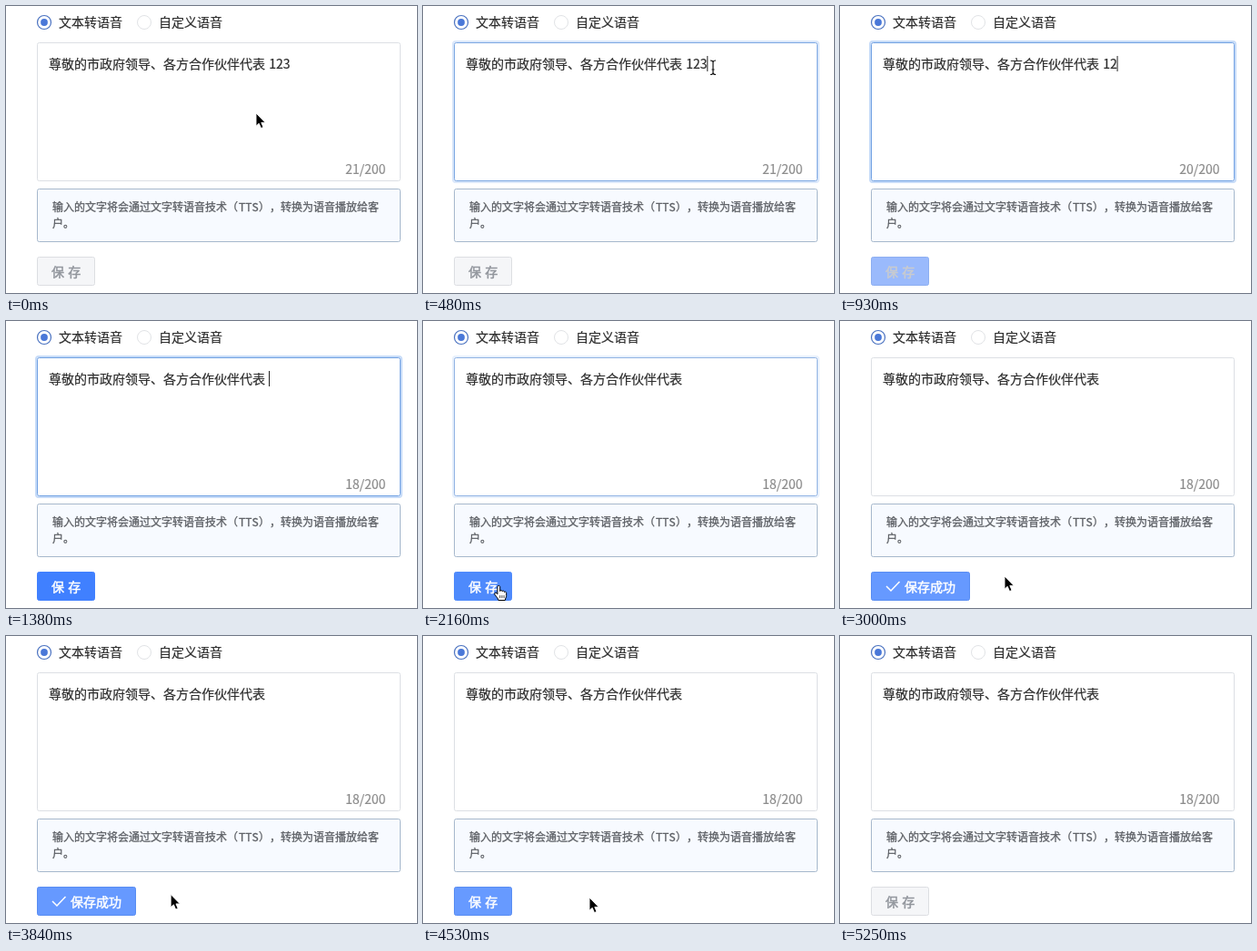
Write an HTML page that moves like this. It is 452 px wide and 316 px high and loops after 5700 ms.

```html
<!DOCTYPE html>
<html lang="zh-CN">
<head>
<meta charset="utf-8">
<title>文本转语音</title>
<style>
html, body { margin: 0; width: 100%; height: 100%; overflow: hidden; background: #fff; }
svg { display: block; width: 452px; height: 316px; }
text {
  font: 14px "Noto Sans CJK SC", "Noto Sans CJK", sans-serif;
  font-kerning: none; text-spacing-trim: space-all;
  word-spacing: 1px; white-space: pre;
  color: #2b2b2b; fill: currentColor; stroke: currentColor; stroke-width: .2px;
}
#count { color: #8c8c8c; }
.note text { font-size: 12px; color: #5c5f64; stroke-width: .3px; }
.label, .done text { stroke-width: .5px; }
.done text { color: #fff; }
</style>
</head>
<body>
<svg viewBox="0 0 452 316">
  <circle cx="42" cy="18" r="7.5" fill="#fff" stroke="#4a72c0" stroke-width="1.2"/>
  <circle cx="42" cy="18" r="3.9" fill="#4a78d8"/>
  <circle cx="152" cy="18" r="7.5" fill="#fff" stroke="#e1e3e6"/>
  <text x="58" y="23">文本转语音</text>
  <text x="168" y="23">自定义语音</text>

  <rect id="glow" x="33" y="39" width="402" height="155" rx="3" fill="none" stroke="#c6dbf8" stroke-width="2"/>
  <rect id="box" x="34.5" y="40.5" width="399" height="152" rx="2" fill="#fff"/>
  <text id="words" x="47" y="69"></text>
  <rect id="caret" y="55" width="1" height="17" fill="#222"/>
  <text id="count" x="417.5" y="185" text-anchor="end"></text>

  <g class="note">
    <rect x="34.5" y="201.5" width="399" height="58" rx="2" fill="#f7faff" stroke="#a6b8cc"/>
    <text x="51" y="226">输入的文字将会通过文字转语音技术（</text>
    <text x="256" y="226">TTS</text>
    <text x="278" y="226">），</text>
    <text x="302" y="226">转换为语音播放给客</text>
    <text x="51" y="244">户。</text>
  </g>

  <rect id="button" x="34.5" y="276.5" height="31" rx="2"/>
  <text id="save" class="label" x="50" y="298">保 存</text>
  <g id="done" class="done">
    <path id="tick" d="M51 292L56 297L65.5 287" fill="none" stroke="#fff" stroke-width="1.5" pathLength="1" stroke-dasharray="1 2"/>
    <text x="71" y="298">保存成功</text>
  </g>

  <g id="pointer">
    <path id="arrow" d="M0 0V14.2L3.2 11.3L5.5 16.6L8 15.5L5.8 10.4H10.2Z" fill="#000" stroke="#fff" stroke-width=".9"/>
    <g id="beam" fill="none">
      <path d="M-3-7.5Q0-7.5 0-5.5Q0-7.5 3-7.5M0-5.5V6M-3 8Q0 8 0 6Q0 8 3 8M-1.5 2.5H1.5" stroke="#fff" stroke-width="2.6"/>
      <path d="M-3-7.5Q0-7.5 0-5.5Q0-7.5 3-7.5M0-5.5V6M-3 8Q0 8 0 6Q0 8 3 8M-1.5 2.5H1.5" stroke="#111" stroke-width="1.2"/>
    </g>
    <g id="hand">
      <path d="M-1.6 1.2C-1.6-.6 1.2-.6 1.2 1.2V6C1.5 4.6 3.6 4.8 3.7 6.2C4.2 5.2 6 5.5 6 7C6.6 6.2 8.2 6.6 8.2 8.2V11C8.2 13 7 13.6 6.8 16H-.6C-.8 14-2.6 12.6-4.6 9.6C-5.6 8-3.6 7-2.4 8.2L-1.6 9.2Z" fill="#fff" stroke="#000"/>
      <path d="M1.2 10.5V13.5M3.4 10.5V13.5M5.6 10.5V13.5" stroke="#000" stroke-width=".7"/>
    </g>
  </g>
</svg>
<script>
const LOOP = 5700;
const SPEECH = '尊敬的市政府领导、各方合作伙伴代表 123';
const DELETES = [780, 960, 1140];
const $ = id => document.getElementById(id);
const show = (id, on) => $(id).setAttribute('visibility', on ? 'visible' : 'hidden');
const set = (id, attrs) => { for (const k in attrs) $(id).setAttribute(k, attrs[k]); };
const rgb = c => `rgb(${c.map(Math.round)})`;

// Eased value at time t between keys of the form [time, ...values]
function track(t, keys) {
  const i = keys.findIndex(k => k[0] > t);
  if (i < 0) return keys[keys.length - 1].slice(1);
  if (!i) return keys[0].slice(1);
  const a = keys[i - 1], b = keys[i];
  const u = (t - a[0]) / (b[0] - a[0]), e = u * u * (3 - 2 * u);
  return a.slice(1).map((v, j) => v + (b[j + 1] - v) * e);
}

const path = [
  [0, 275, 118], [30, 275, 118], [480, 319, 67.5], [1590, 319, 67.5],
  [2100, 83.5, 291.5], [2400, 83.5, 291.5], [3000, 181, 281],
  [3420, 181, 281], [3510, 181, 284], [3810, 181, 284], [3930, 182, 287],
  [4110, 182, 287], [4140, 183, 288], [5190, 183, 288], [5220, 186, 300]
];
const focusKeys = [[330, 0], [540, 1], [2040, 1], [2340, 0]];
const gray = [245, 246, 248], edge = [220, 222, 226], dim = [145, 149, 156];
const blue = [64, 128, 255], hover = [78, 138, 252], white = [255, 255, 255];
const pale = [102, 153, 255], paleEdge = [88, 140, 242];
const fades = (off, on, over, ok) => [
  [780, ...off], [1080, ...on], [2040, ...on], [2150, ...over],
  [2250, ...over], [2520, ...ok], [4515, ...ok], [4800, ...off]
];
const fillKeys = fades(gray, blue, hover, pale);
const edgeKeys = fades(edge, blue, hover, paleEdge);
const labelKeys = fades(dim, white, white, white);

function draw(t) {
  // Field
  const [focus] = track(t, focusKeys);
  const removed = DELETES.filter(d => t >= d).length;
  const length = SPEECH.length - removed;
  $('words').textContent = SPEECH.slice(0, length);
  $('count').textContent = length + '/200';
  set('glow', { opacity: focus * focus });
  set('box', { stroke: rgb(track(focus, [[0, 220, 223, 228], [1, 112, 160, 226]])) });
  const lastKey = Math.max(330, ...DELETES.filter(d => d <= t));
  show('caret', t >= 330 && t < 2040 && (t - lastKey) % 1000 < 500);
  set('caret', { x: 289 + 7.77 * (3 - removed) });

  // Button
  const done = t >= 2250 && t < 4515;
  const width = done ? track(t, [[2250, 63], [2520, 108]])[0] : 63;
  set('button', { width, fill: rgb(track(t, fillKeys)), stroke: rgb(track(t, edgeKeys)) });
  $('save').style.color = rgb(track(t, labelKeys));
  show('save', !done);
  show('done', done);
  set('done', { opacity: track(t, [[2250, 0], [2600, 1]])[0] });
  set('tick', { 'stroke-dashoffset': 1 - track(t, [[2500, 0], [2950, 1]])[0] });

  // Pointer
  const [x, y] = track(t, path);
  const visible = t < 5235 && !(t >= 780 && t < 1590);
  const beam = t >= 90 && y > 40 && y < 193;
  const hand = t < 2700 && y > 276 && x > 34 && x < 98;
  set('pointer', { transform: `translate(${x} ${y})` });
  show('beam', visible && beam);
  show('hand', visible && hand);
  show('arrow', visible && !beam && !hand);
}

const start = performance.now();
function tick(now) {
  draw(Math.max(0, now - start) % LOOP);
  requestAnimationFrame(tick);
}
draw(0);
requestAnimationFrame(tick);
</script>
</body>
</html>
```
